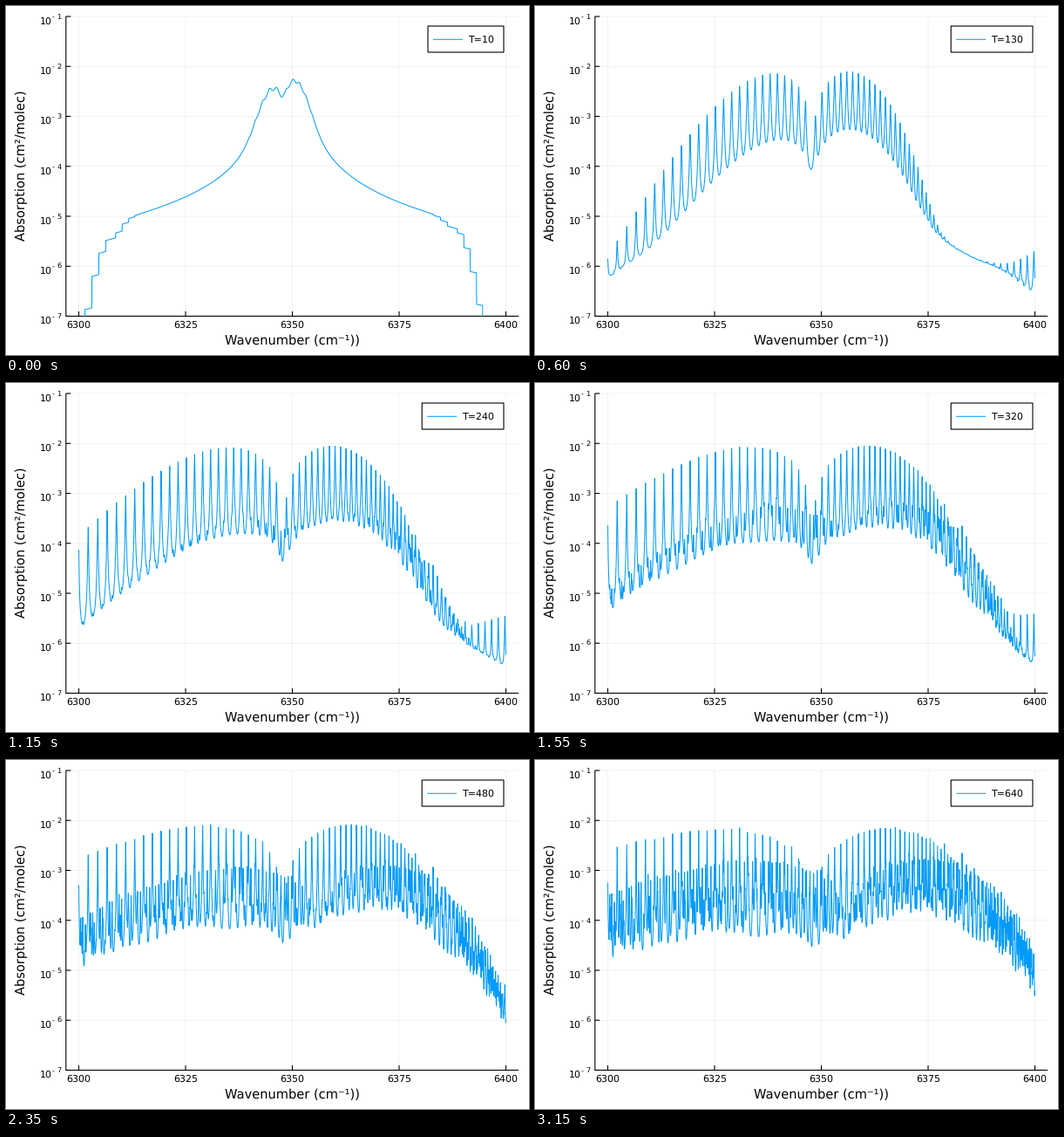
Recreate the animation shown at these times as a matplotlib script. Size 600 px wide and 400 px high, loop 3200 ms.

```python
import numpy as np
import matplotlib.pyplot as plt
from matplotlib.animation import FuncAnimation
from matplotlib.lines import Line2D
from matplotlib.patches import Rectangle

W, H, DPI = 600, 400, 100
PT = 72 / DPI
FRAMES, STEP_MS = 64, 50
LEFT, RIGHT, TOP, BOTTOM = 68.8, 588.2, 12, 355.5
BLUE = "#009afa"

# Spectroscopic model: rovibrational bands with pressure-broadened lines
C2 = 1.4388        # second radiation constant, cm K
B_LOW = 0.3902     # rotational constant, 1/cm
BEND = 667.4       # bending mode, 1/cm
CUTOFF = 40        # line wing cutoff, 1/cm
AREA = 0.051       # integrated band strength


def band(centre, lin, quad, energy=0, parity=0, weight=1):
    """Rows of position, J, lower energy and strength factor."""
    j = np.arange(parity, 116, 2)
    rows = []
    for m, share in ((-j, j), (j + 1, j + 1)):
        pos = centre + lin * m + quad * m**2
        rows.append(np.array([pos, j, energy + B_LOW * j * (j + 1), weight * share]))
    return np.hstack(rows)


def all_bands():
    yield band(6347.85, 0.7768, -0.00363)
    yield band(6415.3, 0.777, 0, weight=4.2e-4)
    for v in (1, 2):
        for odd in (0, 1):
            quad = -0.00316 - 0.00024 * odd - 0.0003 * (v - 1)
            yield band(6352 + 4.3 * v, 0.7795 - 0.002 * odd, quad, BEND * v, odd)
    for k in (0, 1):
        yield band(6346.3 - 10 * k, 0.778, -0.0036, 1285 + 103 * k)


lines = np.hstack(list(all_bands()))
near = (abs(lines[0] - 6350) < 50 + CUTOFF) & (lines[3] > 0)
pos, rot, energy, share = lines[:, near]

nu = np.linspace(6300, 6400, 5001)
dist2 = (nu[:, None] - pos) ** 2
dist2[dist2 > CUTOFF**2] = np.inf
gamma_ref = 0.059 + 0.021 * np.exp(-rot / 12)


def partition(temp):
    vib = (1 - np.exp(-C2 * BEND / temp)) ** 2 * (1 - np.exp(-2 * C2 * BEND / temp))
    return (temp / (2 * C2 * B_LOW) + 1) / vib


def absorption(temp):
    gamma = gamma_ref * (296 / temp) ** 0.72
    strength = AREA * share * np.exp(-C2 * energy / temp) / partition(temp)
    sigma = (1 / (dist2 + gamma**2)) @ (strength * gamma / np.pi)
    return np.log10(np.maximum(sigma, 1e-9))


plt.rcParams.update({"font.family": "DejaVu Sans", "text.hinting": "no_hinting"})
fig = plt.figure(figsize=(W / DPI, H / DPI), dpi=DPI, facecolor="white")

# Page layer in pixel coordinates, y pointing down
page = fig.add_axes([0, 0, 1, 1])
page.set(xlim=(0, W), ylim=(H, 0))
page.axis("off")

ax = fig.add_axes([LEFT / W, 1 - BOTTOM / H, (RIGHT - LEFT) / W, (BOTTOM - TOP) / H])
ax.set(xlim=(6297, 6403), ylim=(-7, -1))
ax.axis("off")


def label(x, y, text, size=11, **kw):
    return page.text(x, y, text, fontsize=size * PT, color="black", **kw)


def stroke(xs, ys, color="black", width=1.1, **kw):
    line = Line2D(xs, ys, color=color, lw=width * PT, solid_capstyle="butt",
                  snap=False, **kw)
    return page.add_line(line)


for value in range(6300, 6401, 25):
    x = LEFT + (value - 6297) / 106 * (RIGHT - LEFT)
    stroke([x, x], [TOP, BOTTOM], alpha=0.1, width=0.5)
    stroke([x, x], [BOTTOM, BOTTOM - 5.5])
    label(x, 369, str(value), ha="center")

for power in range(1, 8):
    y = TOP + (power - 1) / 6 * (BOTTOM - TOP)
    stroke([LEFT, RIGHT], [y, y], alpha=0.1, width=0.5)
    stroke([LEFT, LEFT + 5.5], [y, y])
    label(38.7, y + 8.7, "10")
    label(53, y + 3, "-", 8.3)
    label(63.5, y + 3, str(power), 8.3, ha="right")

stroke([LEFT, LEFT], [TOP, BOTTOM + 0.5])
stroke([LEFT, RIGHT], [BOTTOM, BOTTOM])
label(328.5, 388.5, "Wavenumber (cm⁻¹))", 14.67, ha="center")
label(17.7, 183, "Absorption (cm²/molec)", 14.67,
      ha="center", va="center", rotation=90)

curve, = ax.plot([], [], color=BLUE, lw=PT, solid_joinstyle="round")

box = page.add_patch(Rectangle((484, 23), 87, 30, fc="white", ec="black",
                               lw=1.1 * PT, snap=False))
key = stroke([], [], BLUE, 1)
caption = label(530, 42, "")


def update(i):
    temp = 10 * (i + 1)
    curve.set_data(nu, absorption(temp))
    text = f"T={temp}"
    left = 571 - 87 - 6.8 * (len(text) - 4)
    box.set_x(left)
    box.set_width(571 - left)
    key.set_data([left + 6, left + 40], [38.3, 38.3])
    caption.set_text(text)
    caption.set_x(left + 46)
    return curve, box, key, caption


anim = FuncAnimation(fig, update, frames=FRAMES, interval=STEP_MS,
                     repeat=True, repeat_delay=0, blit=False)
plt.show()
```
